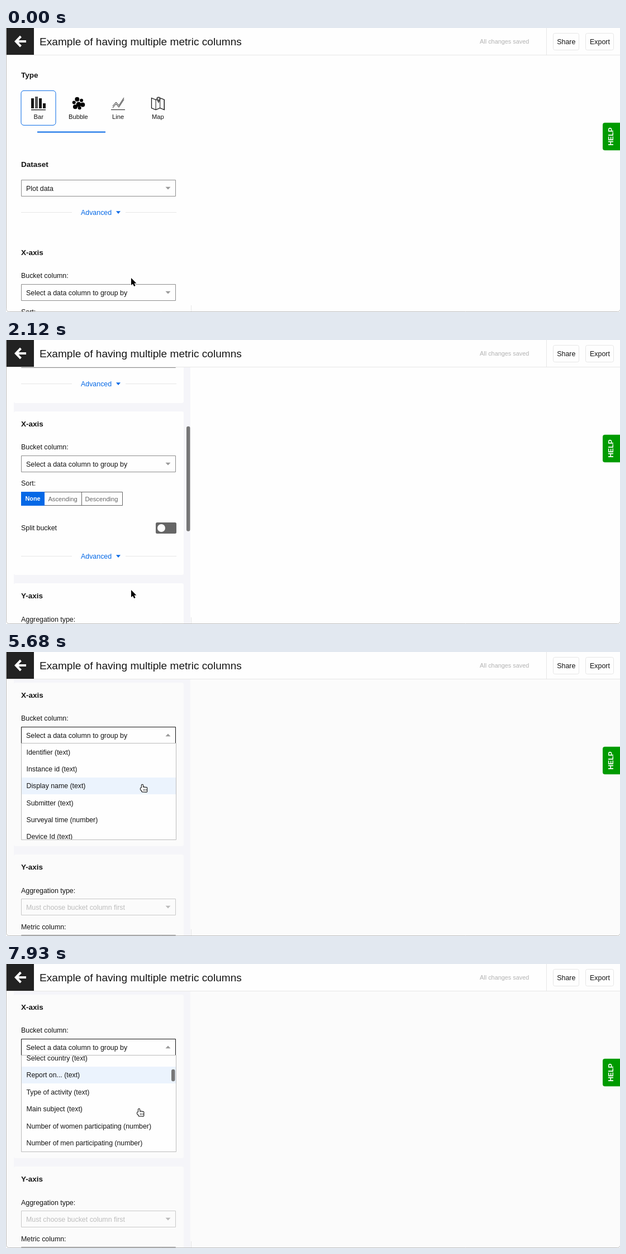
Animation of 1099x509 px, one loop 8000 ms. Source, as an HTML page with a canvas:

```html
<!DOCTYPE html>
<html lang="en">
<head>
<meta charset="utf-8">
<title>Chart editor</title>
<style>
  html, body { margin: 0; width: 100%; height: 100%; overflow: hidden; background: #fefefe; }
  canvas { display: block; width: 1099px; height: 509px; }
</style>
</head>
<body>
<canvas id="stage" width="1099" height="509"></canvas>
<script>
const ctx = document.getElementById('stage').getContext('2d');
const LOOP = 8000;
const FAMILY = '"Liberation Sans", Arial, sans-serif';
const BLUE = '#0468e6', INK = '#141414', LINE = '#e6e6e6', WHITE = '#fefefe', SHADE = '#fbfbfb';
const ROW = 30.35, MENU_TOP = 164, FIRST_SCROLL = 129.3, SECOND_SCROLL = 63.3;
const PROMPT = 'Select a data column to group by';
const COLUMNS = ['Identifier (text)', 'Instance id (text)', 'Display name (text)', 'Submitter (text)',
  'Surveyal time (number)', 'Device Id (text)', 'Select country (text)', 'Report on... (text)',
  'Type of activity (text)', 'Main subject (text)', 'Number of women participating (number)',
  'Number of men participating (number)', 'Number of children (number)'];

// Fraction of a movement made in `count` even jumps, the first at `start` and the last at `end`.
function stepped(t, start, end, count) {
  if (t < start) return 0;
  const done = 1 + Math.floor((t - start) / (end - start) * (count - 1) + 0.01);
  return Math.min(count, done) / count;
}
const smooth = p => p * p * (3 - 2 * p);
const glide = p => Math.sin(Math.PI / 2 * p ** 1.25);
const mix = (a, b, p) => a + (b - a) * p;

function text(str, x, cy, { size = 12.4, color = INK, weight = 'normal', align = 'left' } = {}) {
  ctx.font = `${weight} ${size}px ${FAMILY}`;
  ctx.fillStyle = color;
  ctx.textAlign = align;
  ctx.fillText(str, x, Math.round(cy + size * 0.36));
}
const heading = (str, cy) => text(str, 27, cy, { size: 13.5, weight: 'bold' });

function rect(x, y, w, h, color) {
  ctx.fillStyle = color;
  ctx.fillRect(x, y, w, h);
}
function paint(fill, stroke, width = 1) {
  if (fill) { ctx.fillStyle = fill; ctx.fill(); }
  if (stroke) { ctx.strokeStyle = stroke; ctx.lineWidth = width; ctx.stroke(); }
}
function rounded(x, y, w, h, r, fill, stroke, width) {
  ctx.beginPath();
  ctx.roundRect(x, y, w, h, r);
  paint(fill, stroke, width);
}
const frame = (x, y, w, h, color, fill) => rounded(x + 0.5, y + 0.5, w - 1, h - 1, 0, fill, color);

function path(points, { fill, stroke, width, close = false } = {}) {
  ctx.beginPath();
  points.forEach(([x, y]) => ctx.lineTo(x, y));
  if (close) ctx.closePath();
  paint(fill, stroke, width);
}
function dot(x, y, r, fill, stroke) {
  ctx.beginPath();
  ctx.arc(x, y, r, 0, Math.PI * 2);
  paint(fill, stroke, 1.2);
}
function caret(x, y, color, dir = 1, half = 4.5) {
  path([[x - half, y - 2.2 * dir], [x + half, y - 2.2 * dir], [x, y + 2.5 * dir]], { fill: color });
}
function clipped(x, y, w, h, draw) {
  ctx.save();
  ctx.beginPath();
  ctx.rect(x, y, w, h);
  ctx.clip();
  draw();
  ctx.restore();
}

function select(y, label, disabled) {
  frame(27, y, 277, 30, disabled ? '#c8c8c8' : '#8c8c8c', disabled ? null : WHITE);
  text(label, 36, y + 15.3, { color: disabled ? '#bdbdbd' : INK });
  caret(290, y + 15, disabled ? '#bbb' : '#999');
}
function advanced(y) {
  rect(27, y, 91, 1, LINE);
  rect(214, y, 91, 1, LINE);
  text('Advanced', 134, y + 0.5, { color: BLUE });
  caret(201, y + 0.5, BLUE, 1, 4);
}

function barIcon() {
  for (let i = 0; i < 4; i++) {
    const height = 21 - 3 * (i - 1) ** 2;
    rect(45 + i * 7, 144 - height, 5, height, i === 1 ? '#555' : INK);
  }
  rect(45, 146, 26, 1.3, INK);
}
function bubbleIcon() {
  dot(130, 137, 4.5, '#000');
  for (let i = 0; i < 6; i++) {
    const angle = i * Math.PI / 3 - 0.8;
    dot(129.5 + 8 * Math.cos(angle), 135.5 + 8 * Math.sin(angle), 3 + (i % 2), '#000');
  }
}
function lineIcon() {
  for (const dy of [0, 3]) {
    path([[191, 140 + dy], [197, 133 + dy], [202, 139 + dy], [211, 125 + dy]], { stroke: INK });
  }
  rect(188, 146, 25, 1, INK);
}
function mapIcon() {
  const folds = [0, 1, 2, 3].map(i => [260.5 + i * 7.6, 125.5 + 3 * (i % 2)]);
  const lower = folds.map(([x, y]) => [x, y + 18]);
  path([...folds, ...lower.slice().reverse()], { stroke: INK, width: 1.3, close: true });
  folds.forEach((fold, i) => path([fold, lower[i]], { stroke: INK }));
  path([[269.5, 128], [276.5, 128], [273, 135]], { fill: '#555' });
  dot(273, 127, 3.8, '#555');
  dot(273, 127, 1.4, WHITE);
}

function chartTypes() {
  heading('Type', 84);
  rounded(27, 112.3, 62, 62, 5, null, BLUE);
  barIcon();
  bubbleIcon();
  lineIcon();
  mapIcon();
  ['Bar', 'Bubble', 'Line', 'Map'].forEach((name, i) =>
    text(name, 58.2 + i * 71.2, 158.5, { size: 11.2, align: 'center' }));
  rect(56, 185.5, 122, 2, BLUE);
}

function sortButtons() {
  const label = { size: 11.2, color: '#666', align: 'center' };
  frame(27, 524, 182, 25, '#666', WHITE);
  rect(27, 524, 42, 25, BLUE);
  rect(135, 524, 1, 25, '#666');
  text('None', 48, 536.5, { ...label, size: 10.8, color: '#fff', weight: 'bold' });
  text('Ascending', 101.5, 536.5, label);
  text('Descending', 171, 536.5, label);
}

function cards(page) {
  const tops = [50, 222, 380, 688, 1088];
  rect(14, 0, 316, 1088, '#f5f5f9');
  for (let i = 0; i < 4; i++) rounded(14, tops[i], 304, tops[i + 1] - tops[i] - 15, 3, page);
}

function sidebarContent() {
  chartTypes();
  heading('Dataset', 244);
  select(272, 'Plot data');
  advanced(330);

  heading('X-axis', 402);
  text('Bucket column:', 27, 444);
  select(459, PROMPT);
  text('Sort:', 27, 509);
  sortButtons();
  text('Split bucket', 27, 589);
  rounded(268, 579, 37, 20, 2.5, '#666');
  dot(278, 589, 7, WHITE);
  advanced(639);

  heading('Y-axis', 710.5);
  text('Aggregation type:', 27, 753);
  select(767, 'Must choose bucket column first', true);
  text('Metric column:', 27, 818);
  select(832, '');
}

function sidebar(t, scroll, page) {
  clipped(1, 49, 330, 459, () => {
    ctx.translate(0, -Math.round(scroll));
    if (scroll > 0) cards(page);
    if (t >= 3170 && t < 3310) {
      rect(222, 510, 96, 163, '#fafafa');
      rect(222, 688, 96, 102, '#fafafa');
    }
    sidebarContent();
  });
  if (scroll === 0) return;
  ctx.globalAlpha = t < 3170 ? 1 : 0.75 * (1 - stepped(t, 3310, 3600, 3));
  rounded(323, 50.5 + scroll * 0.414, 6.5, 188, 3, '#777');
  ctx.globalAlpha = 1;
}

function menu(t, pointerY) {
  const scroll = FIRST_SCROLL * glide(stepped(t, 6130, 7030, 7)) +
    SECOND_SCROLL * smooth(stepped(t, 7480, 7930, 4));
  // The highlight follows the pointer only once scrolling has come to rest.
  const restScroll = t < 7030 ? 0 : FIRST_SCROLL;
  const hovered = Math.max(0, Math.floor((pointerY - MENU_TOP + restScroll) / ROW));

  frame(27, 134, 277, 31, INK, WHITE);
  text(PROMPT, 36, 149.3);
  caret(290, 149, '#999', -1, t < 5080 ? 3.5 : 4.5);
  if (t < 5080) rect(286, 151, 8, 1, '#ccc');

  clipped(27, MENU_TOP, 278, 173, () => {
    rect(27, MENU_TOP, 278, 173, WHITE);
    COLUMNS.forEach((name, i) => {
      const y = MENU_TOP + i * ROW - scroll;
      if (i === hovered) rect(28, Math.round(y), 276, 30, '#ebf3fd');
      text(name, 36.5, y + 15.2, { size: 12.3 });
    });
    if (scroll > 0) rounded(296, 165 + scroll * 0.123, 6.5, 21.5, 3.2, '#777');
  });
  frame(27, MENU_TOP - 1, 278, 174, '#bbb');
}

function header() {
  rect(0, 0, 1099, 48, WHITE);
  rect(0, 48, 1099, 1, LINE);
  rect(1, 0, 49, 48, '#222');
  path([[36, 24], [18, 24]], { stroke: '#fff', width: 4 });
  path([[26.5, 15], [17.8, 24], [26.5, 33]], { stroke: '#fff', width: 4 });
  text('Example of having multiple metric columns', 60, 24, { size: 19.1 });
  text('All changes saved', 848, 24, { size: 10.9, color: '#b3b3b3' });
  rect(967, 0, 1, 48, LINE);
  rounded(979.5, 9.5, 46, 30, 3, null, LINE);
  rounded(1037.5, 9.5, 50, 30, 3, null, LINE);
  text('Share', 1002.8, 24.3, { align: 'center' });
  text('Export', 1063, 24.3, { align: 'center' });
}

function helpTab() {
  rounded(1068, 169.7, 36, 49.5, 4, '#009b00');
  ctx.save();
  ctx.translate(1083, 194.5);
  ctx.rotate(-Math.PI / 2);
  text('HELP', 0, 0, { size: 12.2, weight: 'bold', color: '#fff', align: 'center' });
  ctx.restore();
}

function windowEdge() {
  rounded(0.5, -10, 1099, 518.5, 5, null, '#bdbdbd');
  rect(331, 497, 1, 11, LINE);
}

function pointerAt(t) {
  if (t < 3170) return [224, 448];
  if (t < 5530) {
    const p = smooth((stepped(t, 3170, 4190, 8) * 8 - 1) / 7);
    return [mix(228, 269, p), mix(304, 144, p)];
  }
  const p = glide(stepped(t, 5530, 5830, 3));
  return [mix(269, 238, p), mix(144, 260, p)];
}

function arrow() {
  const outline = [[0, 0], [0, 13], [3, 10.4], [5.2, 15], [7.6, 14], [5.5, 9.6], [9.4, 9.4]];
  path(outline, { stroke: '#fff', width: 2, close: true });
  path(outline, { fill: '#000', close: true });
}
function hand() {
  const shape = (fill, stroke) => {
    for (let i = 0; i < 4; i++) rounded(-1 + i * 2.4, i ? 3.5 + i * 0.4 : -0.3, 2.2, 8, 1.1, fill, stroke, 2);
    rounded(-1, 6, 9, 6.5, 2, fill, stroke, 2);
    rounded(-3, 5.5, 3, 4, 1.4, fill, stroke, 2);
  };
  shape(null, '#000');
  shape('#fff');
  for (let i = 1; i < 4; i++) rect(-0.4 + i * 2.4, 7.5, 0.8, 3, '#000');
}

function pointer(t, [x, y]) {
  if (t >= 4930 && t < 5080) dot(271.5, 145.5, 9, null, INK);
  ctx.save();
  ctx.translate(x, y);
  ctx.lineJoin = 'round';
  if (t < 5530) arrow(); else hand();
  ctx.restore();
}

function render(t) {
  const scroll = 226 * smooth(stepped(t, 600, 1380, 6)) + 99 * smooth(stepped(t, 1830, 2570, 6));
  const page = t < 3310 ? WHITE : SHADE;
  const position = pointerAt(t);
  rect(0, 0, 1099, 509, page);
  sidebar(t, scroll, page);
  if (t >= 4930) menu(t, position[1]);
  header();
  helpTab();
  windowEdge();
  pointer(t, position);
}

const start = performance.now();
function tick() {
  render((performance.now() - start) % LOOP);
  requestAnimationFrame(tick);
}
tick();
</script>
</body>
</html>
```
